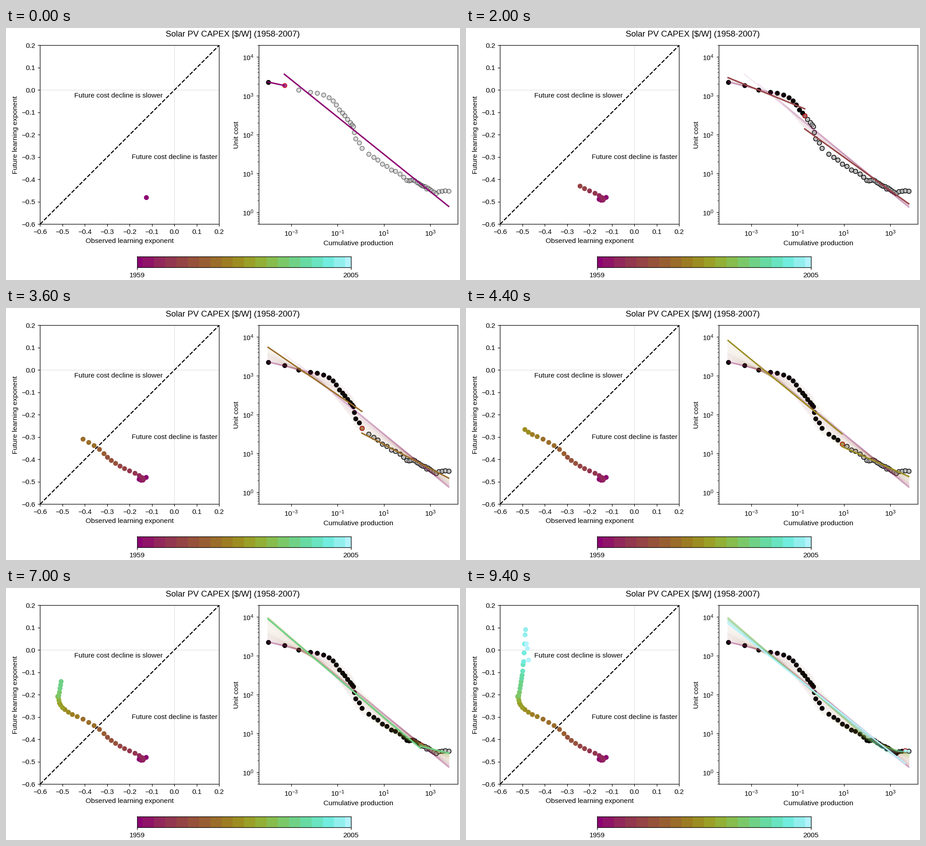
A matplotlib script for the animation above (9.6 s loop, 1004 by 558 pixels).

```python
import numpy as np
import matplotlib.pyplot as plt
from matplotlib.animation import FuncAnimation
from matplotlib.colors import LinearSegmentedColormap
from matplotlib.ticker import NullLocator

W, H, DPI = 1004, 558, 111.6
FRAMES, INTERVAL = 48, 200
GHOST_ALPHA = 0.08

plt.rcParams.update({"font.family": "Liberation Sans", "font.size": 10})

# Stage positions of the yearly observations, 1958 to 2007.
X = np.array([
    579.5, 615.5, 646.5, 673, 688, 702, 713.5, 723, 730, 737,
    744, 749, 755, 761, 765, 768, 769.5, 773, 781, 787,
    802, 813, 822, 831.5, 842, 851.5, 860.5, 871, 879, 885.5,
    891, 895, 900, 904, 909, 913, 917, 920, 923, 927,
    930, 933, 937, 941, 946, 951, 957, 964, 971, 979])
Y = np.array([
    119.5, 127.1, 137.3, 142, 144, 147.5, 153.5, 161, 170, 181,
    188, 194, 201.5, 208.5, 213.5, 218, 231, 244.5, 253.5, 265.5,
    278.5, 285.5, 291.5, 301, 305.5, 313.5, 317, 322.5, 330, 337,
    337.5, 337, 336, 338, 342, 344, 347, 349, 350, 350.4,
    355.5, 354, 357, 359.7, 362.5, 365.4, 361.5, 360.8, 360, 360.6])


def log_x(px):
    return (px - 630.5) / 51.33 - 3


def log_y(py):
    return (408.2 - py) / 86.05


production, cost = log_x(X), log_y(Y)

hawaii = LinearSegmentedColormap.from_list("steps", [
    "#8C0273", "#922A59", "#954742", "#996330", "#9D831E",
    "#97A92A", "#80C55F", "#66D89C", "#6CEBDB", "#B3F2FD"])
LEVELS = 19


def year_color(t):
    return hawaii(round(min(t, 1) * LEVELS) / LEVELS)


def fit(part):
    """Power law fit: exponent and end points of the fitted line."""
    slope, offset = np.polyfit(production[part], cost[part], 1)
    ends = production[part][[0, -1]]
    return slope, 10 ** ends, 10 ** (slope * ends + offset)


past_fits = [fit(slice(0, i + 2)) for i in range(FRAMES)]
future_fits = [fit(slice(i + 1, None)) for i in range(FRAMES)]
colors = [year_color(i / 46) for i in range(FRAMES)]
exponents = np.array([(p[0], f[0]) for p, f in zip(past_fits, future_fits)])

fig = plt.figure(figsize=((W + 0.01) / DPI, (H + 0.01) / DPI), dpi=DPI,
                 facecolor="white")


def add_axes(left, top, right, bottom):
    return fig.add_axes([left / W, 1 - bottom / H,
                         (right - left) / W, (bottom - top) / H])


def stage_text(x, baseline, text, size=10):
    fig.text(x / W, 1 - baseline / H, text, fontsize=size,
             ha="center", va="baseline")


plane = add_axes(75.4, 38.3, 471.4, 434.3)
plane.set(xlim=(-0.6, 0.2), ylim=(-0.6, 0.2),
          xlabel="Observed learning exponent",
          ylabel="Future learning exponent")
ticks = np.round(np.arange(-0.6, 0.21, 0.1), 1)
plane.set_xticks(ticks)
plane.set_yticks(ticks)
plane.axhline(0, color="lightgrey", lw=0.5, zorder=0)
plane.axvline(0, color="lightgrey", lw=0.5, zorder=0)
plane.plot([-0.6, 0.2], [-0.6, 0.2], "k--", lw=1.5)

curve = add_axes(559.2, 38.3, 999.4, 434.3)
curve.set(xscale="log", yscale="log",
          xlim=10 ** log_x(np.array([559.2, 999.4])), ylim=(0.5, 2e4),
          xlabel="Cumulative production", ylabel="Unit cost")
curve.set_xticks([1e-3, 1e-1, 1e1, 1e3])
curve.xaxis.set_minor_locator(NullLocator())

bar = add_axes(289.8, 506.2, 762.8, 530.2)
edges = np.clip((np.arange(LEVELS + 2) - 0.5) / LEVELS, 0, 1)
for i in range(LEVELS + 1):
    bar.axvspan(edges[i], edges[i + 1], color=hawaii(i / LEVELS), lw=0)
bar.set(xlim=(0, 1), ylim=(0, 1), yticks=[])
bar.set_xticks([0, 1], ["1959", "2005"])

stage_text(501.5, 19, "Solar PV CAPEX [$/W] (1958-2007)", 12)
stage_text(248.7, 153.5, "Future cost decline is slower")
stage_text(372.7, 290, "Future cost decline is faster")

moving = []


def dots(part, face, edge, alpha=None):
    moving.append(curve.scatter(10 ** production[part], 10 ** cost[part],
                                s=36, facecolors=[face], edgecolors=[edge],
                                linewidths=1, alpha=alpha, zorder=1))


def update(frame):
    while moving:
        moving.pop().remove()
    split = frame + 1
    moving.append(plane.scatter(*exponents[:split].T, s=36,
                                c=colors[:split], zorder=3))
    # Translucent markers are painted again each step and so grow darker.
    for _ in range(min(split, 6)):
        dots(slice(split, None), "silver", "black", 0.5)
    dots(slice(0, split), "black", "black")
    dots(slice(split, split + 1), colors[frame], "red", 0.7)
    for i in range(split):
        alpha = 1 if i == frame else GHOST_ALPHA
        for _, x, y in (past_fits[i], future_fits[i]):
            moving.extend(curve.plot(x, y, color=colors[i], lw=2, alpha=alpha))
    return moving


animation = FuncAnimation(fig, update, frames=FRAMES, interval=INTERVAL,
                          init_func=lambda: moving, repeat=True,
                          repeat_delay=0, blit=False)
plt.show()
```
